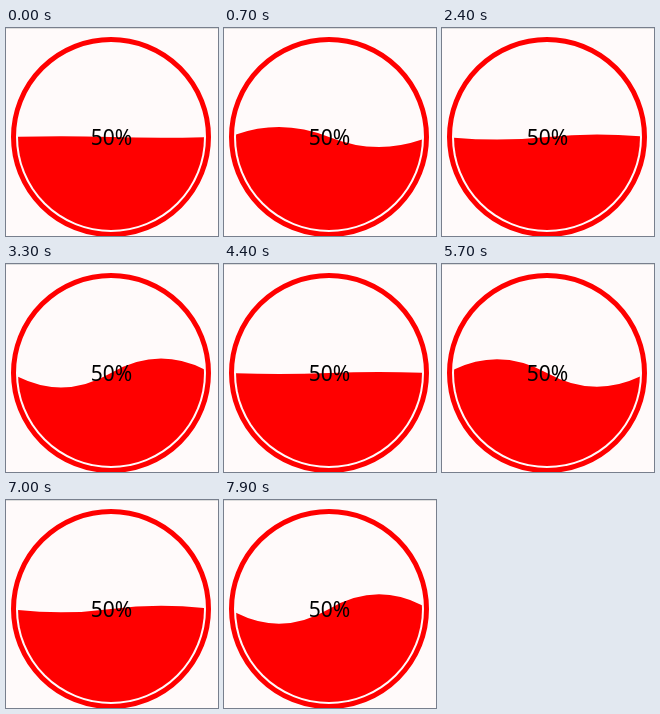
Recreate the animation shown at these times as an HTML page. Size 212x208 px, loop 8000 ms.

```html
<!DOCTYPE html>
<html lang="en">
<head>
<meta charset="utf-8">
<title>Wave gauge</title>
<style>
  html, body { margin: 0; width: 100%; height: 100%; overflow: hidden; background: #fffafa; }
  svg { display: block; }
  text { font: 21px "Noto Sans", "Open Sans", sans-serif; text-anchor: middle; }
</style>
</head>
<body>
<svg width="212" height="208" viewBox="0 0 212 208">
  <clipPath id="bowl"><circle cx="105" cy="109" r="93"/></clipPath>
  <rect width="212" height="1" fill="#ddd"/>
  <circle cx="105" cy="109" r="97.5" fill="none" stroke="red" stroke-width="5"/>
  <g clip-path="url(#bowl)"><path id="wave" fill="red"/></g>
  <text x="105.5" y="117">50%</text>
</svg>
<script>
  const LOOP = 8000, STEP = 100;
  const PERIOD = 4536, PEAK_AT = 1075, HEIGHT = 15;
  const wave = document.getElementById('wave');

  // Triangle wave: the swell rises and falls at constant speed.
  function swell(t) {
    const phase = (((t - PEAK_AT) / PERIOD) % 1 + 1) % 1;
    return HEIGHT * (4 * Math.abs(phase - 0.5) - 1);
  }

  function draw(now) {
    const t = Math.floor((now % LOOP) / STEP) * STEP;
    // A quadratic curve reaches half the height of its control point.
    const pull = 2 * swell(t);
    wave.setAttribute('d',
      `M5 109Q55 ${109 - pull} 105 109T205 109V209H5Z`);
    requestAnimationFrame(draw);
  }
  draw(0);
</script>
</body>
</html>
```
